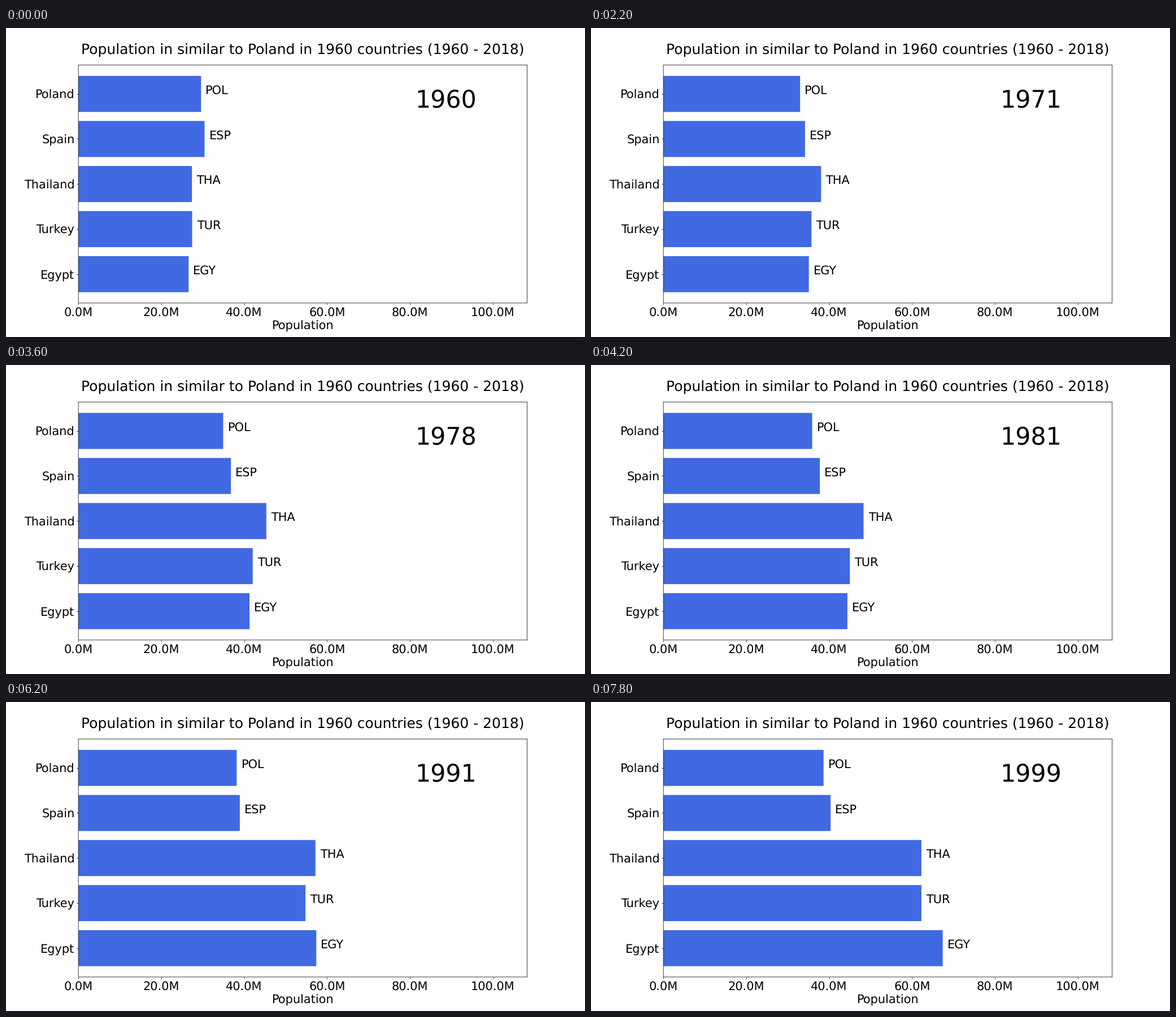
Write a matplotlib script that moves like this. It is 1025 px wide and 547 px high and loops after 8000 ms.

```python
import numpy as np
import matplotlib.pyplot as plt
from matplotlib.animation import FuncAnimation

DPI = 64
K = 1025 / 15 / DPI  # layout is designed for a 15 inch wide figure

plt.rcParams.update({
    "font.family": "DejaVu Sans",
    "font.size": 22 * K,
    "text.hinting": "none",
    "axes.linewidth": 0.8 * K,
    "axes.labelpad": 3.4 * K,
    "axes.titlepad": 21 * K,
    "xtick.major.pad": 4.2 * K,
    "ytick.major.pad": 3.5 * K,
})
for axis in ("xtick", "ytick"):
    plt.rcParams.update({f"{axis}.major.size": 3.5 * K,
                         f"{axis}.major.width": 0.8 * K})

# Population in millions at a few key years, from the bottom row up.
KEY_YEARS = np.array([1960, 1966, 1975, 1981, 1986, 1991, 1999])
COUNTRIES = {
    "Egypt": [26.6, 31.2, 38.5, 44.4, 50.6, 57.4, 67.4],
    "Turkey": [27.45, 31.7, 39.25, 45.0, 50.1, 54.8, 62.25],
    "Thailand": [27.4, 32.85, 42.3, 48.3, 52.9, 57.2, 62.25],
    "Spain": [30.45, 32.3, 35.7, 37.75, 38.6, 38.95, 40.35],
    "Poland": [29.6, 31.7, 34.0, 35.9, 37.45, 38.2, 38.65],
}
CODES = {"Spain": "ESP"}  # the others are the first three letters
YEARS = np.arange(KEY_YEARS[0], KEY_YEARS[-1] + 1)


def yearly(values):
    """Smooth Hermite curve through the key values, one result per year."""
    v = np.array(values)
    slope = np.gradient(v, KEY_YEARS)
    i = np.searchsorted(KEY_YEARS[1:-1], YEARS, side="right")
    span = KEY_YEARS[i + 1] - KEY_YEARS[i]
    u = (YEARS - KEY_YEARS[i]) / span
    ease = u * u * (3 - 2 * u)
    bend = span * u * (1 - u) * (slope[i] * (1 - u) - slope[i + 1] * u)
    return v[i] + (v[i + 1] - v[i]) * ease + bend


population = [yearly(values) for values in COUNTRIES.values()]

fig, ax = plt.subplots(figsize=(1025 / DPI, 547 / DPI), dpi=DPI,
                       facecolor="white")
fig.subplots_adjust(left=0.125, right=0.9, bottom=0.11, top=0.88)
bars = ax.barh(list(COUNTRIES), [p[0] for p in population],
               color="royalblue", snap=False)
codes = [ax.text(0, row, CODES.get(name, name[:3].upper()))
         for row, name in enumerate(COUNTRIES)]
year_text = ax.text(81.2, 3.685, "", fontsize=45 * K)

ax.set_xlim(0, 108.266)
ax.set_ylim(-0.64, 4.64)
ax.set_xticks(range(0, 101, 20))
ax.xaxis.set_major_formatter(lambda x, pos: f"{x:.1f}M")
ax.set_xlabel("Population")
ax.set_title("Population in similar to Poland in 1960 countries (1960 - 2018)",
             fontsize=26.4 * K)
for spine in ax.spines.values():
    spine.set_snap(False)


def update(n):
    for bar, code, people in zip(bars, codes, population):
        bar.set_width(people[n])
        code.set_x(people[n] + 1.1)
    year_text.set_text(str(YEARS[n]))
    return [*bars, *codes, year_text]


anim = FuncAnimation(fig, update, frames=len(YEARS), interval=200,
                     repeat=True, repeat_delay=0, blit=False)
plt.show()
```
